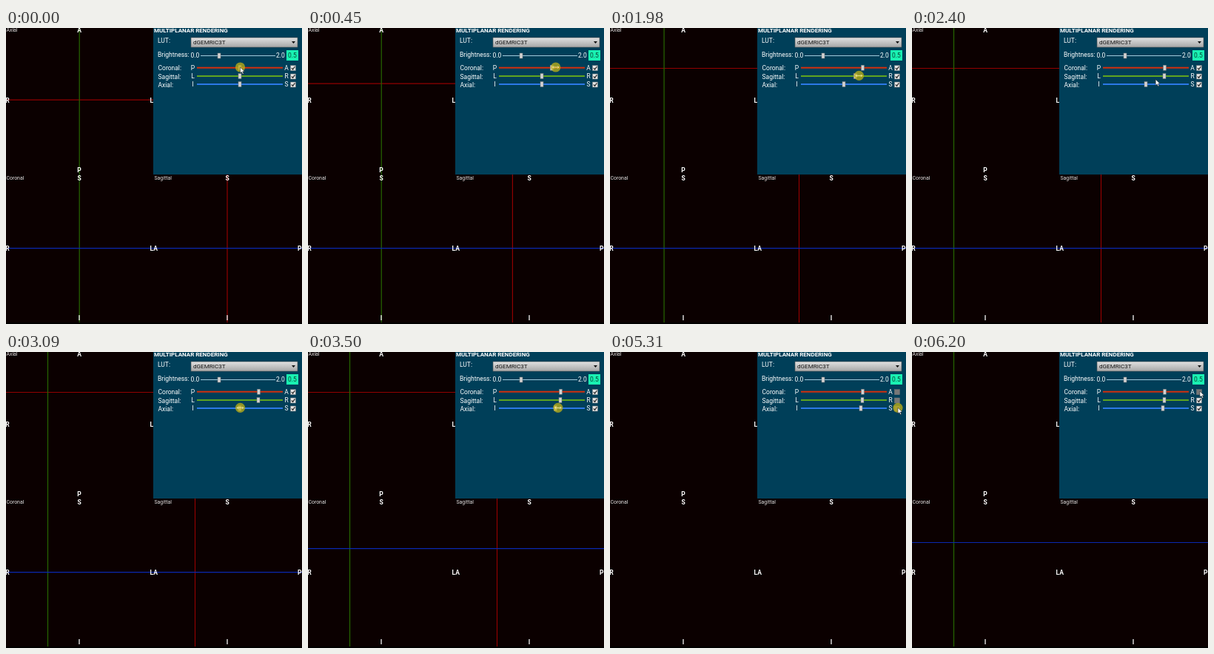
An HTML page that plays this animation: 400x400 px, repeating every 6220 ms.

```html
<!DOCTYPE html>
<html lang="en">
<head>
<meta charset="utf-8">
<title>Multiplanar rendering</title>
<style>
html, body { margin: 0; width: 100%; height: 100%; overflow: hidden; background: #000; }
svg { display: block; width: 100vw; height: 100vh; }
text { font-family: Roboto, sans-serif; fill: #fff; }
.view { font-size: 6.9px; fill: #e4e4e4; }
.side { font-size: 8.5px; font-weight: 700; text-anchor: middle; }
.row { font-size: 8.5px; }
.mid { text-anchor: middle; }
</style>
</head>
<body>
<svg viewBox="0 0 400 400">
  <defs>
    <linearGradient id="silver" x2="0" y2="1">
      <stop offset="0" stop-color="#e2e2e2"/><stop offset="1" stop-color="#a6a6a6"/>
    </linearGradient>
  </defs>
  <rect width="400" height="398" fill="#0b0000"/>
  <g id="lines"></g>
  <g id="labels"></g>
  <rect x="199" width="201" height="198" fill="#003f59"/>
  <text x="200" y="6" font-size="8" font-weight="700">MULTIPLANAR RENDERING</text>
  <text class="row" x="205" y="20">LUT:</text>
  <rect x="250" y="13" width="144" height="13" fill="url(#silver)" stroke="#555" stroke-width=".6"/>
  <text x="253" y="22.3" font-size="8.1" style="fill:#111">dGEMRIC3T</text>
  <path d="M386 18h5l-2.5 3z" fill="#111"/>
  <text class="row" x="205" y="39">Brightness:</text>
  <text class="row mid" x="255.3" y="40">0.0</text>
  <text class="row mid" x="371" y="40">2.0</text>
  <rect x="263" y="37" width="101" height="1" fill="#a5cbdc"/>
  <rect x="379" y="30" width="16" height="14" fill="#19f2b2"/>
  <text class="row mid" x="387" y="40" style="fill:#064536">0.5</text>
  <g id="controls"></g>
  <g id="pointer">
    <circle id="spot" r="6.6" fill="#bdb017" opacity=".76"/>
    <path id="arrow" d="M0 0v8l1.9-1.7 1.4 3 1.4-.6-1.4-2.9h2.6z" fill="#fff" stroke="#111" stroke-width=".5"/>
    <path id="resize" d="M-4 0h8M-2.7-1.5-4.2 0l1.5 1.5M2.7-1.5 4.2 0 2.7 1.5" fill="none" stroke="#fff3b0" stroke-width=".8"/>
  </g>
</svg>
<script>
const LOOP = 6220, HOME = 316;
const $ = id => document.getElementById(id);

function add(parent, tag, attrs, text) {
  const el = document.createElementNS("http://www.w3.org/2000/svg", tag);
  set(el, attrs);
  if (text) el.textContent = text;
  return parent.appendChild(el);
}
function set(el, attrs) { for (const k in attrs) el.setAttribute(k, attrs[k]); }
const show = (el, on) => set(el, { visibility: on ? "visible" : "hidden" });
const mix = (a, b, p) => a + (b - a) * p;
const ramp = (t, a, b) => Math.min(1, Math.max(0, (t - a) / (b - a)));
const easeOut = p => 1 - (1 - p) ** 3;

function view(name, x, y, sides) {
  const g = $("labels");
  const spots = [[99, 5.6], [99, 195.2], [2, 100.6], [196.7, 100.6]];
  add(g, "text", { class: "view", x: x + .5, y: y + 5 }, name);
  spots.forEach(([dx, dy], i) => add(g, "text", { class: "side", x: x + dx, y: y + dy }, sides[i]));
}
view("Axial", 0, 0, "APRL");
view("Coronal", 0, 200, "SIRL");
view("Sagittal", 200, 200, "SIAP");

const handle = (x, y) => add($("controls"), "rect",
  { x: x - 2, y: y - 3.5, width: 4, height: 7, fill: "#d2d2d2", stroke: "#777", "stroke-width": .5 });
handle(288, 37.5);

const across = (right, a, b) => p => `M0 ${mix(a, b, p)}H${right}`;
const down = (top, bottom, a, b) => p => `M${mix(a, b, p)} ${top}V${bottom}`;

// The pointer rests on a slider from arrive to leave, and drags it from start to stop
const sliders = [
  { name: "Coronal", ends: "PA", y: 53.7, end: 341.5, color: "#d42f0e", ink: "#900000",
    arrive: -150, start: 20, stop: 850, leave: 860,
    cuts: [across(199, 97.2, 54.5), down(198, 398, 299, 255.5)] },
  { name: "Sagittal", ends: "LR", y: 65, end: 341, color: "#5fa420", ink: "#276800",
    arrive: 1250, start: 1730, stop: 2140, leave: 2330,
    cuts: [down(0, 398, 99.2, 56.5)] },
  { name: "Axial", ends: "IS", y: 76, end: 339, color: "#2c78e6", ink: "#0a28b0",
    arrive: 2700, start: 3110, stop: 3600, leave: 3640,
    cuts: [across(400, 297.6, 257.5)] }
];

for (const s of sliders) {
  const g = $("controls"), y = s.y;
  add(g, "text", { class: "row", x: 205.5, y: y + 3.5 }, s.name + ":");
  add(g, "text", { class: "row mid", x: 252.5, y: y + 3.2 }, s.ends[0]);
  add(g, "rect", { x: 258, y: y - 1, width: 116, height: 2, fill: s.color });
  add(g, "text", { class: "row mid", x: 379, y: y + 3.2 }, s.ends[1]);
  s.box = add(g, "rect", { x: 384.5, y: y - 3, width: 7, height: 7, stroke: "#777", "stroke-width": .5 });
  s.tick = add(g, "path", { d: `M386 ${y + .5}l1.6 1.8 2.8-4`, fill: "none", stroke: "#222", "stroke-width": 1.2 });
  s.knob = handle(HOME, y);
  s.lines = s.cuts.map(() => add($("lines"), "path", { stroke: s.ink, "stroke-width": 1.2 }));
}

// Boxes are cleared from top to bottom, then ticked back up after a pause
const clicks = [0, 1, 2, 2, 1, 0, 0].map((n, i) =>
  ({ s: sliders[n], time: 4400 + 250 * i + (i > 2 ? 200 : 0) }));

const stops = [
  ...sliders.flatMap(s => [[s.arrive, HOME, s.y], [s.leave, s.end, s.y]]),
  ...clicks.flatMap(c => [[c.time - 50, 389, c.s.y], [c.time + 60, 389, c.s.y]]),
  [LOOP, 389, sliders[0].y]
];

function cursor(t) {
  const i = stops.findIndex(s => s[0] > t);
  const [t0, x0, y0] = stops[i - 1], [t1, x1, y1] = stops[i];
  const p = easeOut(ramp(t, t0, t1));
  return [mix(x0, x1, p), mix(y0, y1, p) - .7];
}

function draw(t) {
  let [x, y] = cursor(t), pressed = false, sizing = false;
  for (const s of sliders) {
    const p = ramp(t, s.start, s.stop);
    const knobX = mix(HOME, s.end, p);
    const on = clicks.filter(c => c.s === s && c.time <= t).length % 2 === 0;
    set(s.knob, { x: knobX - 2 });
    set(s.box, { fill: on ? "#e4e4e4" : "#777" });
    show(s.tick, on);
    s.lines.forEach((line, i) => {
      set(line, { d: s.cuts[i](p) });
      show(line, on);
    });
    if (t >= s.arrive && t < s.leave) {
      // The pointer runs a little ahead of the knob
      x = knobX + 5 * Math.sin(Math.PI * p) + .5;
      pressed = t >= s.arrive + 150;
      sizing = t >= s.arrive + 210;
    }
  }
  const clicked = clicks.some(c => Math.abs(t - c.time) < 45);
  set($("pointer"), { transform: `translate(${x} ${y})` });
  show($("spot"), pressed || clicked);
  show($("arrow"), !sizing);
  show($("resize"), sizing);
}

const begin = performance.now();
function frame(now) {
  draw(Math.max(0, now - begin) % LOOP);
  requestAnimationFrame(frame);
}
draw(0);
requestAnimationFrame(frame);
</script>
</body>
</html>
```
